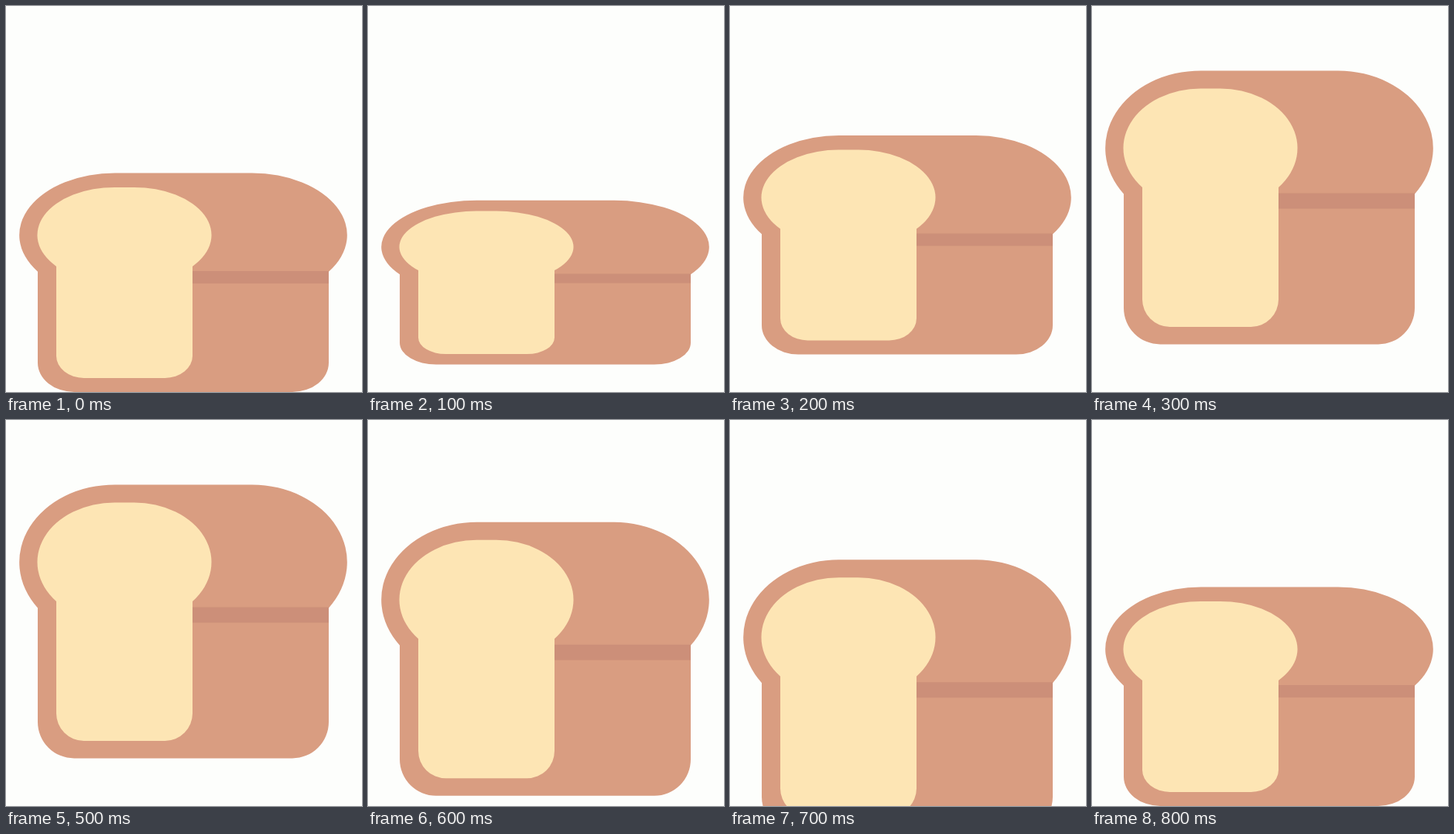
Animation of 460x498 px, one loop 0.9 s. Source, as an HTML page:

```html
<!DOCTYPE html>
<html>
<head>
<meta charset="utf-8">
<title>Bouncing bread</title>
<style>
  html, body { margin: 0; width: 100%; height: 100%; overflow: hidden; background: #fdfefc; }
  svg { display: block; width: 460px; height: 498px; }
</style>
</head>
<body>
<svg viewBox="0 0 460 498">
  <!-- The loaf is drawn around y = 0 so that squashing keeps its centre. -->
  <g id="loaf">
    <path fill="#d99d81" d="M141-176.5H318A123.5 100 0 0 1 417-17.5V129.500A47 47 0 0 1 370 176.500H88A47 47 0 0 1 41 129.500V-17.500A123.500 100 0 0 1 141-176.500Z"/>
    <path fill="#cc8f79" d="M241-18.500H417V1.500H241Z"/>
    <path fill="#fde5b4" d="M141-153.500H165A100 77 0 0 1 241-26V118.500A35.500 35.500 0 0 1 205.500 154H100.500A35.500 35.500 0 0 1 65 118.500V-26A100 77 0 0 1 141-153.500Z"/>
  </g>
</svg>
<script>
  const STEP_MS = 100;
  const APEX_Y = 211.5;
  const DROP = 48.4;
  const drops = [3, 3, 2, 1, 0, 1, 2, 3, 3];
  const squash = [0.8, 0.6, 0.8, 1, 1, 1, 1, 1, 0.8];
  const loaf = document.getElementById('loaf');

  function draw() {
    const step = Math.floor(performance.now() / STEP_MS) % drops.length;
    const y = APEX_Y + DROP * drops[step];
    loaf.setAttribute('transform', `translate(0 ${y}) scale(1 ${squash[step]})`);
    requestAnimationFrame(draw);
  }
  draw();
</script>
</body>
</html>
```
